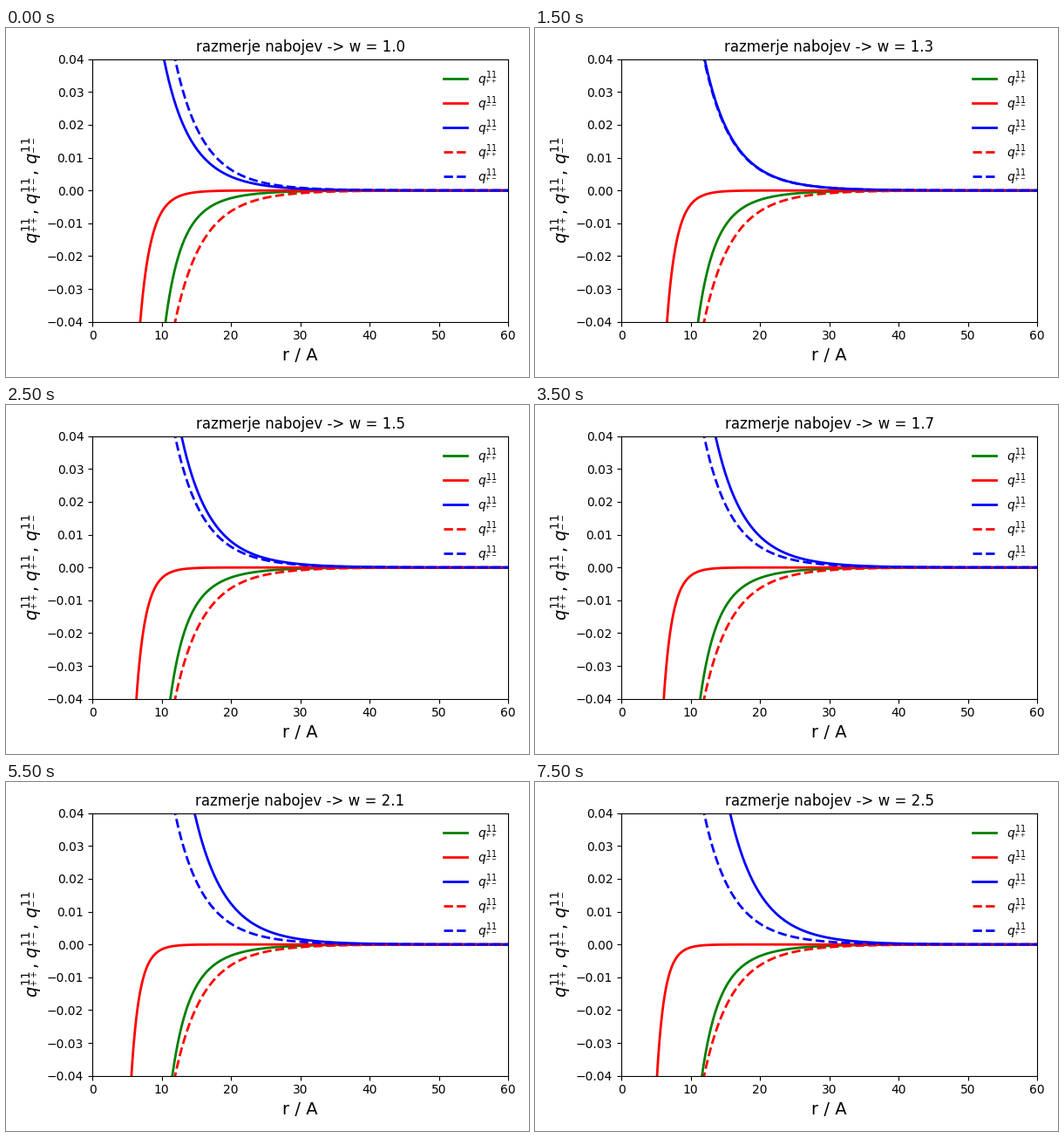
Write a matplotlib script that moves like this. It is 600x400 px and loops after 8 s.

```python
import numpy as np
import matplotlib.pyplot as plt
from matplotlib.animation import FuncAnimation

KAPPA = 0.1645
LIMIT = 0.04
FRAMES = 16

r = np.linspace(2, 60, 1200)
u = np.exp(-KAPPA * r) / r


def q_pp(w):
    return -(1.866 - 0.754 / w**1.5) * (u + 70 * u**2)


def q_mm(w):
    r0 = 8.21 - 1.22 * w - 0.07 / w**4
    k = 0.62 - 0.274 / w
    return -LIMIT * (r0 / r)**2 * np.exp(-k * (r - r0))


def q_pm(w):
    return (2.27 + 4.03 * (w - 1)) * u


def symbol(signs):
    return r"$q_{^{%s}}^{11}$" % signs


fig, ax = plt.subplots(figsize=(6, 4), dpi=100)
fig.subplots_adjust(left=0.165, right=0.96, bottom=0.1582, top=0.9107)
ax.set_xlim(0, 60)
ax.set_ylim(-LIMIT, LIMIT)
ax.set_xlabel("r / A", fontsize=14)
ax.set_ylabel(", ".join(map(symbol, ("++", "+-", "--"))), fontsize=14)
title = ax.set_title("razmerje nabojev -> w = 1.0")

curves = [
    (ax.plot([], [], color=color, lw=2, label=symbol(signs))[0], func)
    for color, signs, func in (
        ("green", "++", q_pp),
        ("red", "--", q_mm),
        ("blue", "+-", q_pm),
    )
]
ax.plot(r, -3.41 * u, "--", color="red", lw=2, label=symbol("++"))
ax.plot(r, 3.41 * u, "--", color="blue", lw=2, label=symbol("+-"))
ax.legend(loc="upper right", frameon=False)


def update(i):
    w = 1 + i / 10
    title.set_text(f"razmerje nabojev -> w = {w:.1f}")
    for line, func in curves:
        line.set_data(r, func(w))
    return [title] + [line for line, _ in curves]


anim = FuncAnimation(fig, update, frames=FRAMES, interval=500, repeat=True)
plt.show()
```
